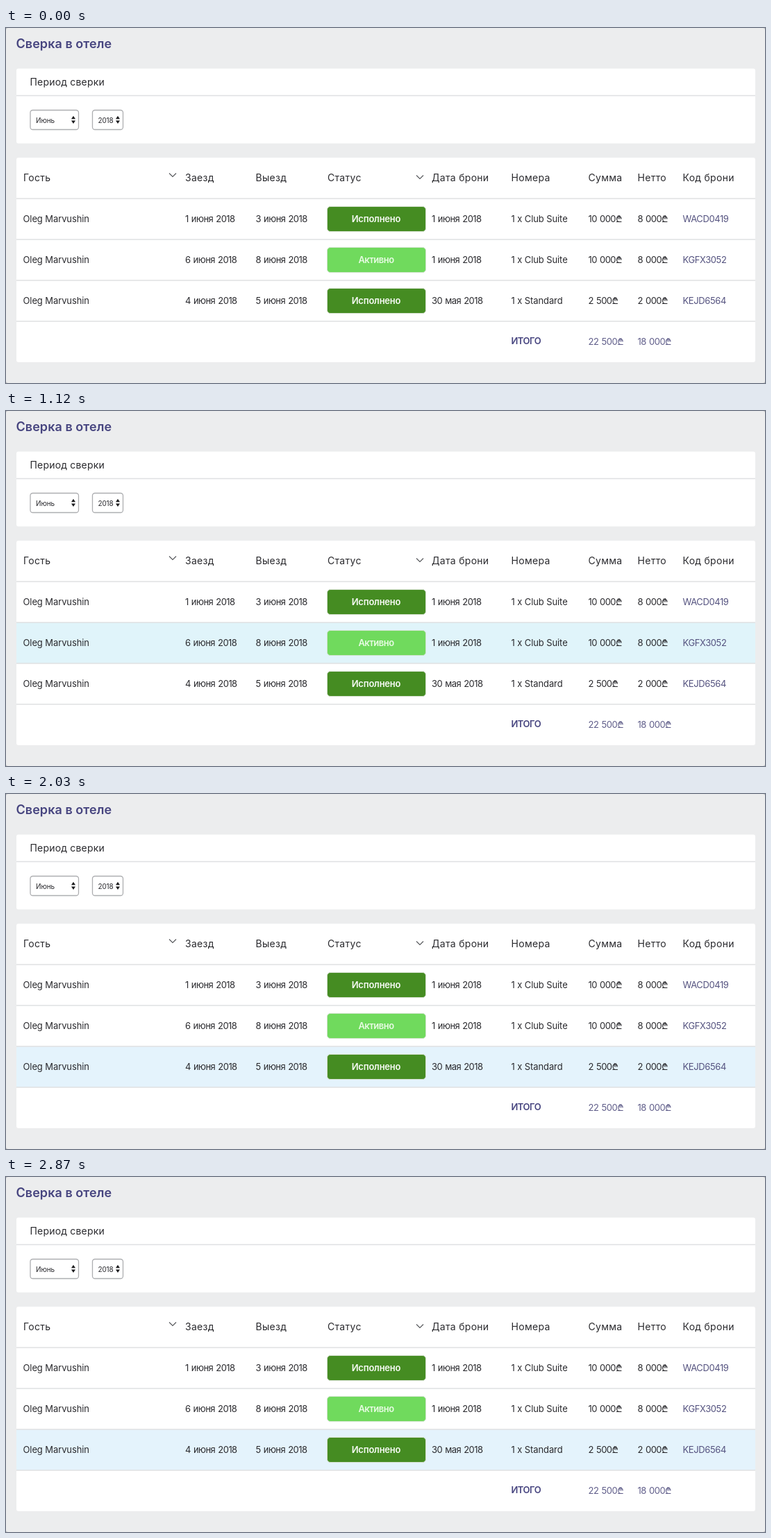
An HTML page for the animation above (2.94 s loop, 1093x512 px).

```html
<!DOCTYPE html>
<html lang="ru">
<head>
<meta charset="utf-8">
<title>Сверка</title>
<style>
  html, body { margin: 0; width: 100%; height: 100%; overflow: hidden; background: #ecedee; }
  svg { display: block; width: 1093px; height: 512px; }
  text { font-family: Inter, "Open Sans", sans-serif; font-size: 13px; letter-spacing: -.1px; fill: #2a2a2e; }
  .title { font-size: 18px; font-weight: 600; letter-spacing: .05px; fill: #46447f; }
  .head { font-size: 14px; letter-spacing: .3px; }
  .period { font-size: 14px; letter-spacing: .2px; }
  .num { letter-spacing: -.55px; word-spacing: 1px; }
  .code { letter-spacing: -.4px; fill: #54527f; }
  .total { letter-spacing: -.5px; word-spacing: 1px; fill: #605e8a; }
  .strong { font-weight: 600; fill: #46447f; }
  .badge { font-weight: 600; letter-spacing: -.2px; fill: #f6faf4; text-anchor: middle; }
  .active { fill: #e8fbe4; letter-spacing: -.5px; }
  .option { font-size: 10px; letter-spacing: -.15px; }
  .line { stroke: #dfe0e2; stroke-width: 1.5; }
  .select { fill: #fff; stroke: #adaeb1; stroke-width: 1.3; }
  .chevron { fill: none; stroke: #55565a; stroke-width: 1.1; }
</style>
</head>
<body>
<svg id="stage" viewBox="0 0 1093 512"></svg>
<script>
const stage = document.getElementById('stage');
const LOOP = 2940;
const ROW_TOP = 246, ROW_STEP = 59;
const GUEST = 'Oleg Marvushin';

// Row highlights: start, end (ms) and tint
const hovers = [
  [630, 1120, '#e4f2fc'],
  [1120, 1610, '#e0f4fa'],
  [1610, LOOP, '#e4f3fc']
];

const rows = [
  ['1 июня 2018', '3 июня 2018', true, '1 июня 2018', '1 x Club Suite', '10 000₾', '8 000₾', 'WACD0419'],
  ['6 июня 2018', '8 июня 2018', false, '1 июня 2018', '1 x Club Suite', '10 000₾', '8 000₾', 'KGFX3052'],
  ['4 июня 2018', '5 июня 2018', true, '30 мая 2018', '1 x Standard', '2 500₾', '2 000₾', 'KEJD6564']
];

function add(tag, attrs, content) {
  const node = document.createElementNS('http://www.w3.org/2000/svg', tag);
  for (const key in attrs) node.setAttribute(key, attrs[key]);
  if (content) node.textContent = content;
  stage.appendChild(node);
  return node;
}
const rect = (x, y, width, height, rx, attrs) => add('rect', { x, y, width, height, rx, ...attrs });
const label = (x, y, content, cls = '') => add('text', { x, y, class: cls }, content);
const line = y => add('path', { d: `M15 ${y}H1079`, class: 'line' });
const chevron = (x, y) => add('path', { d: `M${x - 5} ${y - 2.5}l5 5l5 -5`, class: 'chevron' });

function select(x, width, content) {
  rect(x, 118.5, width, 28, 3.5, { class: 'select' });
  label(x + 8, 136.5, content, 'option');
  const ax = x + width - 7.5;
  add('path', { d: `M${ax - 3} 131.3l3 -4.5l3 4.5zM${ax - 3} 133.5l3 4.5l3 -4.5z`, fill: '#1c1c1e' });
}

function badge(y, done) {
  rect(462.5, y - 18, 142, 36, 4.5, {
    fill: done ? '#458c22' : '#70da5d',
    stroke: done ? '#d3dfcc' : '#cfe3cb'
  });
  label(533, y + 4.7, done ? 'Исполнено' : 'Активно', done ? 'badge' : 'badge active');
}

rect(0, 0, 1093, 512, 0, { fill: '#b8b9bb' });
rect(0, 0, 1093, 512, 3, { fill: '#ecedee' });
label(14.5, 29, 'Сверка в отеле', 'title');

rect(15, 58.5, 1064, 108, 3, { fill: '#fff' });
label(34.5, 83, 'Период сверки', 'period');
line(97.5);
select(35, 69.5, 'Июнь');
select(124.5, 44, '2018');

rect(15, 187, 1064, 295, 3, { fill: '#fff' });
const tints = hovers.map((h, i) =>
  rect(15, ROW_TOP + ROW_STEP * i, 1064, ROW_STEP, 0, { fill: h[2], visibility: 'hidden' }));

const columns = [258, 359.5, 463, 613, 727.5, 838.5, 909.5, 974.5];
const heads = ['Заезд', 'Выезд', 'Статус', 'Дата брони', 'Номера', 'Сумма', 'Нетто', 'Код брони'];
label(25, 221, 'Гость', 'head');
heads.forEach((h, i) => label(columns[i], 221, h, 'head'));
chevron(240, 212);
chevron(596, 215);

const styles = ['num', 'num', '', 'num', '', 'num', 'num', 'code'];
rows.forEach((row, r) => {
  const mid = ROW_TOP + ROW_STEP * (r + .5);
  label(24.5, mid + 4.7, GUEST);
  row.forEach((cell, c) => {
    if (c === 2) badge(mid, cell);
    else label(columns[c], mid + 4.7, cell, styles[c]);
  });
});
for (let i = 0; i < 4; i++) line(ROW_TOP + ROW_STEP * i);

label(727.5, 455.5, 'ИТОГО', 'total strong');
label(838.5, 457.3, '22 500₾', 'total');
label(909.5, 457.3, '18 000₾', 'total');

function draw() {
  const t = performance.now() % LOOP;
  hovers.forEach(([from, to], i) =>
    tints[i].setAttribute('visibility', t >= from && t < to ? 'visible' : 'hidden'));
  requestAnimationFrame(draw);
}
draw();
</script>
</body>
</html>
```
